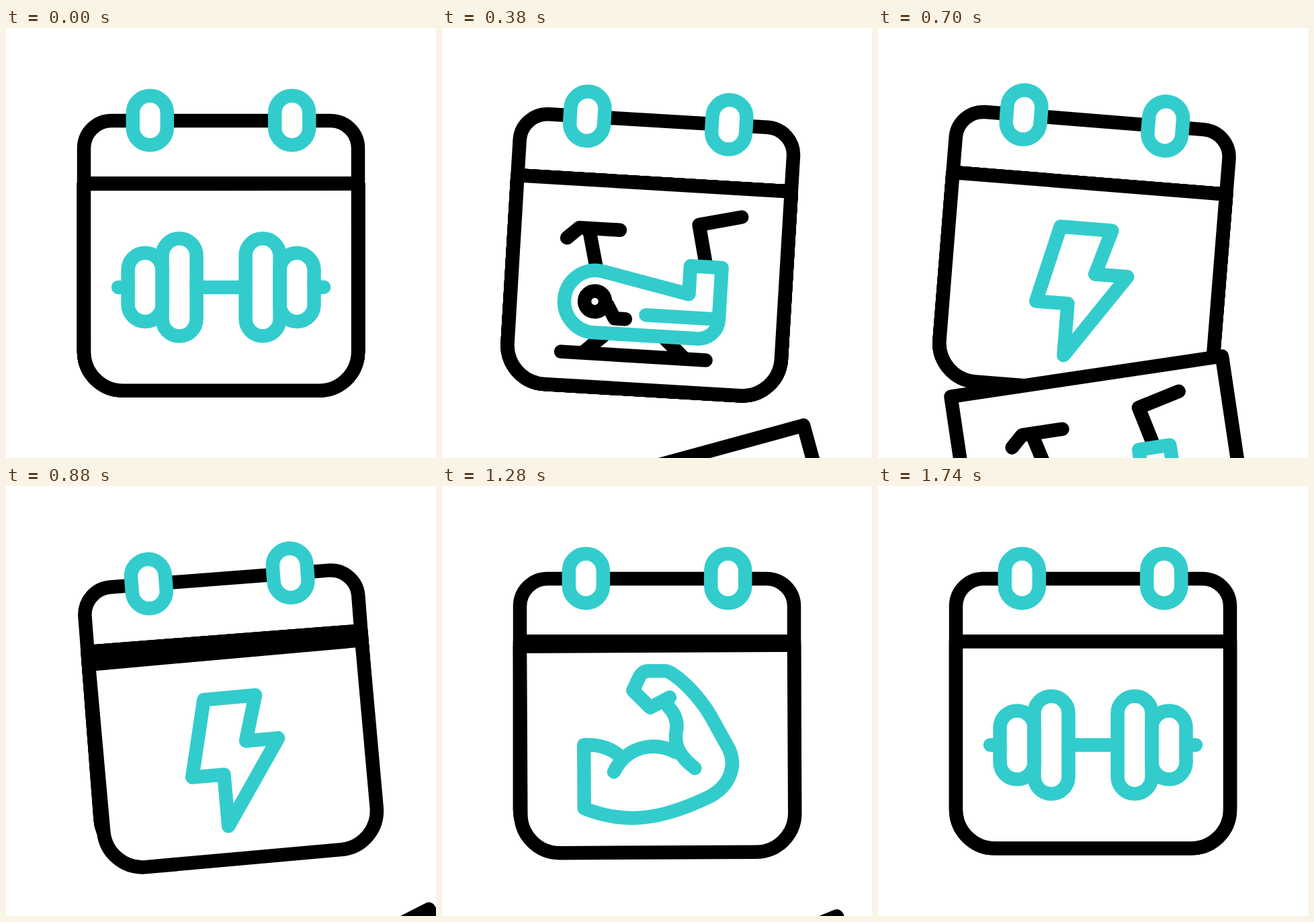
An HTML page that plays this animation: 640 px wide and 640 px high, repeating every 2060 ms.

```html
<!DOCTYPE html>
<html lang="en">
<head>
<meta charset="utf-8">
<title>Workout calendar</title>
<style>
  html, body { margin: 0; width: 100%; height: 100%; overflow: hidden; background: #fff; }
  svg { display: block; width: 100vw; height: 100vh; }
  .line { fill: none; stroke: #000; stroke-width: 20.5; stroke-linecap: round; stroke-linejoin: round; }
  .teal { stroke: #3cc; }
  .paper { fill: #fff; }
</style>
</head>
<body>
<svg viewBox="0 0 640 640">
  <defs>
    <path id="sheet" class="paper" d="M116 231.5H524V481.500A58 58 0 0 1 466 539.300H174A58 58 0 0 1 116 481.500Z"/>
    <rect id="plate" width="51" height="145.400" rx="25.500"/>
    <rect id="small" width="51" height="102.200" rx="25.500"/>
    <rect id="ring" class="paper teal" y="100.700" width="51" height="73.500" rx="25.500"/>

    <g id="dumbbell" class="teal">
      <path d="M167 385.500H181.500M283.500 385.500H356.500M458.500 385.500H473"/>
      <use href="#small" x="181.500" y="334.400"/>
      <use href="#small" x="407.500" y="334.400"/>
      <use href="#plate" x="232.500" y="312.800"/>
      <use href="#plate" x="356.500" y="312.800"/>
    </g>

    <g id="bike">
      <path d="M195 320L212.500 303.800H273M227 305L240.500 359M452.700 273.800L390 289L403 344
               M231 487L258 462M378 487L350 462M196 489.600H412"/>
      <path class="teal" d="M251.700 366.800L381 393V350.800H427.700V428A30 30 0 0 1 398 458.300H242
               A46.200 46.200 0 1 1 251.700 366.800ZM319 427.700H427"/>
      <circle cx="242" cy="412" r="15.500"/>
      <path d="M261 416L272.700 435.500H288.800"/>
    </g>

    <path id="bolt" class="teal" d="M282 299H359L339 365.600H387.200L302 489.600V412.500H254.600Z"/>

    <path id="arm" class="teal" d="M210.500 473V378.500C234 377.500 252 384 265.500 397
             M255 419C274 381 314 373 347 390
             M336 322C348 334 351 347 347.500 362C345.500 382 354 397 375.500 414
             M338.500 308.500L309.500 323.500L284 298L293 279Q298 269 307 269H331Q336 269 342 273
             C366 289 391 319 404 345L426.500 386C438 412 427 442 395 457.500
             C360 474 315 490 275 487.500C250 486.500 230 481 210.500 473"/>
  </defs>

  <g id="calendar" class="line">
    <path d="M116 179A41 41 0 0 1 157 138H483A41 41 0 0 1 524 179V481.500A58 58 0 0 1 466 539.300H174A58 58 0 0 1 116 481.500ZM116 231.500H524"/>
    <use href="#ring" x="188.800"/>
    <use href="#ring" x="400.200"/>
    <g id="pages"></g>
  </g>
</svg>
<script>
const LOOP = 2060, FALL_TIME = 565, FALL = 535;
const calendar = document.getElementById('calendar');
const stack = document.getElementById('pages');

// Bottom to top: icon and the moment its page starts to fall
const pages = [['dumbbell', Infinity], ['arm', 1245], ['bolt', 822], ['bike', 405], ['dumbbell', -8]]
  .map(([icon, start]) => {
    const el = document.createElementNS('http://www.w3.org/2000/svg', 'g');
    el.innerHTML = `<use href="#sheet"/><use href="#${icon}"/>`;
    stack.append(el);
    return { el, start };
  });

// Time and angle of the calendar's swing
const swing = [[0, 0], [200, -4.45], [552, 10.65], [895, -4.45], [1130, 0]];

const ease = u => u * u * (3 - 2 * u);

function swingAngle(t) {
  const i = swing.findIndex(key => key[0] > t);
  if (i < 0) return 0;
  const [t0, a0] = swing[i - 1], [t1, a1] = swing[i];
  return a0 + (a1 - a0) * ease((t - t0) / (t1 - t0));
}

function placePage({ el, start }, t) {
  const u = Math.max(0, (t - start) / FALL_TIME);
  el.style.display = u < 1 ? '' : 'none';
  const y = FALL * ease(Math.min(u, 1));
  const x = 14.4 * (y / 263) ** 2.77;   // drifts right as it drops
  el.setAttribute('transform', `translate(${x} ${y}) rotate(${-0.0455 * y} 320 231.5)`);
}

function draw() {
  const t = performance.now() % LOOP;
  calendar.setAttribute('transform', `rotate(${swingAngle(t)} 320 167)`);
  pages.forEach(page => placePage(page, t));
  requestAnimationFrame(draw);
}
draw();
</script>
</body>
</html>
```
